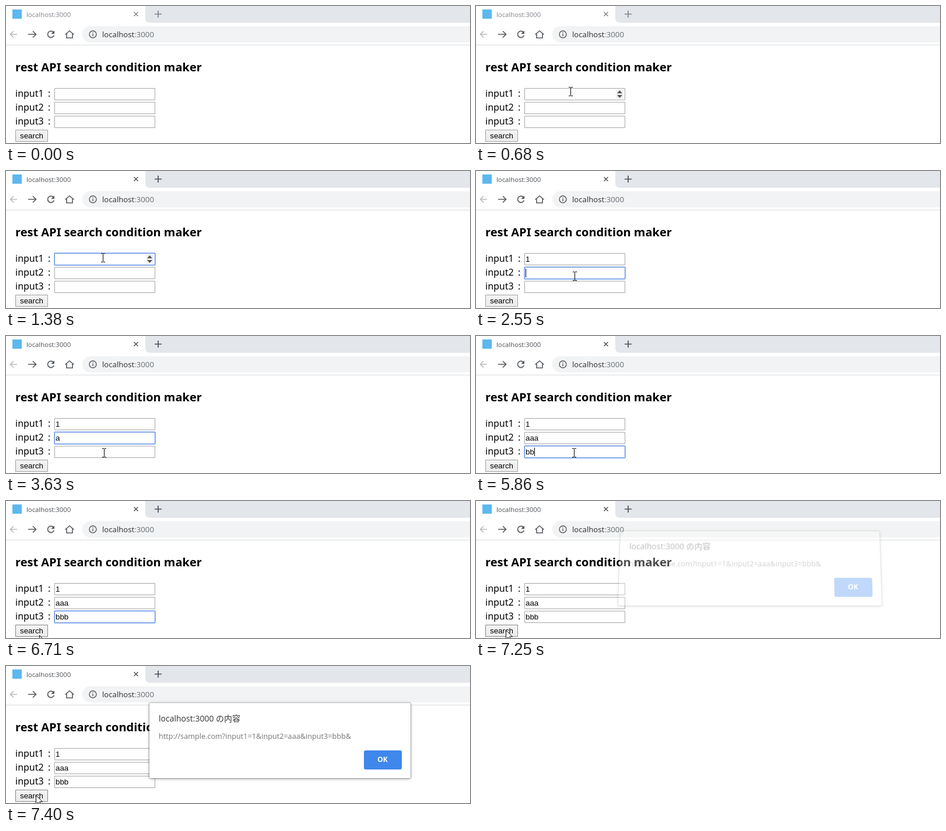
These frames come from a looping animation (796x237 px, 8 s). An HTML page with a canvas:

```html
<!DOCTYPE html>
<html lang="en">
<head>
<meta charset="utf-8">
<title>Search form</title>
<style>
  html, body { margin: 0; width: 100%; height: 100%; overflow: hidden; background: #fff; }
  canvas { display: block; }
  #dialog {
    position: absolute; left: 246px; top: 64px; width: 448px; height: 130px;
    background: #fff; border-radius: 2px;
    box-shadow: 0 0 0 1px rgba(0,0,0,.2), 0 1px 5px rgba(0,0,0,.4);
    font-family: "Open Sans", "Noto Sans CJK JP", sans-serif; white-space: nowrap;
  }
  #dialog * { position: absolute; left: 16px; line-height: 20px; }
  #dialog h1 { top: 17px; margin: 0; font-size: 14px; font-weight: 400; color: #333; }
  #dialog p { top: 47px; margin: 0; font-size: 12.66px; color: #737373; }
  #dialog b {
    left: 367.5px; top: 82px; width: 65px; line-height: 32.5px; border-radius: 3px;
    background: #4087ec; color: #fff; font-size: 12px; text-align: center;
  }
</style>
</head>
<body>
<canvas id="stage" width="796" height="237"></canvas>
<div id="dialog">
  <h1>localhost:3000 の内容</h1>
  <p>http://sample.com?input1=1&amp;input2=aaa&amp;input3=bbb&amp;</p>
  <b>OK</b>
</div>
<script>
const ctx = document.getElementById('stage').getContext('2d');
const dialog = document.getElementById('dialog');
const LOOP = 8000, BLINK = 530;
const UI = '"Open Sans", sans-serif';
const PAGE = '"Noto Sans", sans-serif';
const FORM = '13.333px "Liberation Sans", Arial, sans-serif';
const ROWS = [142, 166, 190];
const INK = '#55595e';

// [time, focused field, its text, how long the caret has been on]
const EDITS = [
  [920, 0, '', 70], [1550, 0, '1', 0],
  [2250, 1, '', 0], [3090, 1, 'a', 0], [3940, 1, 'aa', 0], [4240, 1, 'aaa', 0],
  [4630, 2, '', 0], [5550, 2, 'b', 0], [5860, 2, 'bb', 0], [6160, 2, 'bbb', 0],
  [7020, -1, '', 0],
];

// [first step, last step, step count, x, y]
const MOVES = [
  [70, 530, 7, 158, 145], [600, 830, 4, 166, 150],
  [1630, 2080, 7, 171, 177], [2550, 2550, 1, 169, 182], [2630, 2630, 1, 169, 186],
  [2780, 2780, 1, 177, 199], [2860, 2940, 2, 172, 190],
  [3240, 3320, 2, 169, 204], [3400, 3400, 1, 168, 202],
  [6480, 6710, 4, 57, 232], [6790, 6940, 3, 51, 223],
];

function pointerAt(t) {
  let x = 390, y = 262;
  for (const [start, end, steps, toX, toY] of MOVES) {
    if (t < start) break;
    const gap = (end - start) / (steps - 1) || 1;
    const p = Math.min(1, (Math.floor((t - start) / gap) + 1) / steps);
    const eased = 1 - (1 - p) ** (steps > 5 ? 2 : 1);
    x += (toX - x) * eased;
    y += (toY - y) * eased;
  }
  return [Math.round(x), Math.round(y)];
}

function formAt(t) {
  const form = { focus: -1, texts: ['', '', ''], caret: false };
  for (const [time, field, text, lead] of EDITS) {
    if (t < time) break;
    form.focus = field;
    if (field >= 0) form.texts[field] = text;
    form.caret = (t - time + lead) % (2 * BLINK) < BLINK;
  }
  return form;
}

function text(str, x, y, font, color) {
  ctx.font = font;
  ctx.fillStyle = color;
  ctx.fillText(str, x, y);
}

function rect(x, y, w, h, color) {
  ctx.fillStyle = color;
  ctx.fillRect(x, y, w, h);
}

function frame(x, y, w, h, color, radius = 0) {
  ctx.beginPath();
  ctx.roundRect(x + .5, y + .5, w - 1, h - 1, radius);
  ctx.strokeStyle = color;
  ctx.lineWidth = 1;
  ctx.stroke();
}

function line(d, color, width) {
  ctx.strokeStyle = color;
  ctx.lineWidth = width;
  ctx.stroke(new Path2D(d));
}

function fill(d, color) {
  ctx.fillStyle = color;
  ctx.fill(new Path2D(d));
}

function drawBrowser(active) {
  const tone = active ? '#4c5156' : '#80848a';
  rect(0, 0, 796, 29, '#e3e6ea');
  fill('M0 0H239V21Q239 29 247 29H0Z', '#fff');
  rect(11, 6, 16, 16, '#5cb8ee');
  text('localhost:3000', 35, 19, '11.3px ' + UI, tone);
  line('M219.5 10.5l7 7m0 -7l-7 7', tone, 1.5);
  line('M255 14h12M261 8v12', tone, 1.7);

  line('M19 49H7.5M13 43.5L7.5 49L13 54.5', '#b9bbbe', 1.7);
  line('M38 49H51.5M46 43.5L51.5 49L46 54.5', INK, 1.7);
  line('M81.3 45.2A5.6 5.6 0 1 0 82.4 50.8', INK, 1.7);
  fill('M83 42.5V48.3H77.2Z', INK);
  line('M101.5 49.5L109 43L116.5 49.5M104 48V55.2H114V48', INK, 1.6);
  fill('M796 35H145a14 14 0 0 0 0 28H796Z', '#f1f3f4');
  line('M143 49a6 6 0 1 0 12 0a6 6 0 1 0 -12 0M149 48v4.3M149 45.4v1.5', INK, 1.4);
  const font = '13.2px ' + UI;
  text('localhost', 165, 54, font, '#2b2e32');
  text(':3000', 165 + ctx.measureText('localhost').width, 54, font, '#6a6f74');
  rect(0, 67, 796, 1, '#dadce0');
}

function drawSpinner(y) {
  rect(240, y + 3, 13, 15, '#f0f0f0');
  fill(`M242 ${y + 9}l4.5 -5l4.5 5z`, '#505050');
  fill(`M242 ${y + 12}l4.5 5l4.5 -5z`, '#505050');
}

function drawField(y, value, focused, caret) {
  frame(83, y, 173, 21, focused ? '#5f8de4' : '#a5a5a5');
  text(value, 85, y + 15, FORM, '#000');
  if (!focused) return;
  frame(82, y - 1, 175, 23, '#a9c2f3', 1.5);
  const caretX = 85 + Math.round(ctx.measureText(value).width);
  if (caret) rect(caretX, y + 3, 1, 15, '#000');
}

function drawButton(hover, pressed) {
  const shade = ctx.createLinearGradient(0, 214, 0, 235);
  shade.addColorStop(0, pressed ? '#e8e8e8' : '#f4f4f4');
  shade.addColorStop(1, pressed ? '#e8e8e8' : '#ebebeb');
  rect(16, 214, 56, 21, shade);
  frame(16, 214, 56, 21, hover ? '#858585' : '#a0a0a0');
  text('search', 24, 229, FORM, '#000');
}

function drawForm(form, px, py, pressed) {
  text('rest API search condition maker', 16, 113, 'bold 20px ' + PAGE, '#000');
  ROWS.forEach((y, i) => {
    text('input' + (i + 1), 16, y + 15, '16px ' + PAGE, '#000');
    text(':', 72, y + 15, '16px ' + PAGE, '#000');
    drawField(y, form.texts[i], form.focus === i, form.caret);
  });
  if (form.focus === 0 || (overField(px, py) && py < 164)) drawSpinner(ROWS[0]);
  drawButton(px >= 16 && px < 72 && py >= 214, pressed);
}

// The alert drops in while its top edge tilts forward.
function placeDialog(t) {
  const [opacity, drop, tilt] = t < 7250 ? [0, 0, 0]
    : t < 7320 ? [.33, -13, 8]
    : t < 7400 ? [.8, -4, 2.5] : [1, 0, 0];
  dialog.style.opacity = opacity;
  dialog.style.transform = tilt
    ? `translateY(${drop}px) perspective(1000px) rotateX(${tilt}deg)` : 'none';
}

function overField(x, y) {
  return x >= 83 && x < 256 && y >= 142 && y < 211;
}

function drawPointer(x, y) {
  ctx.save();
  ctx.translate(x, y);
  if (overField(x, y)) {
    line('M-3 -7.5H0M1 -7.5H4M.5 -7V7M-3 7.5H0M1 7.5H4', '#000', 1);
  } else {
    const arrow = 'M.5 .5V16L4 12.7L6.5 18.3L9 17.2L6.6 11.8H11.5Z';
    fill(arrow, '#fff');
    line(arrow, '#000', 1);
  }
  ctx.restore();
}

function draw(now) {
  const t = now % LOOP;
  const [px, py] = pointerAt(t);
  rect(0, 0, 796, 237, '#fff');
  drawBrowser(t >= 920);
  drawForm(formAt(t), px, py, t >= 7020 && t < 7250);
  drawPointer(px, py);
  placeDialog(t);
}

const began = performance.now();
function tick() {
  draw(performance.now() - began);
  requestAnimationFrame(tick);
}
tick();
</script>
</body>
</html>
```
